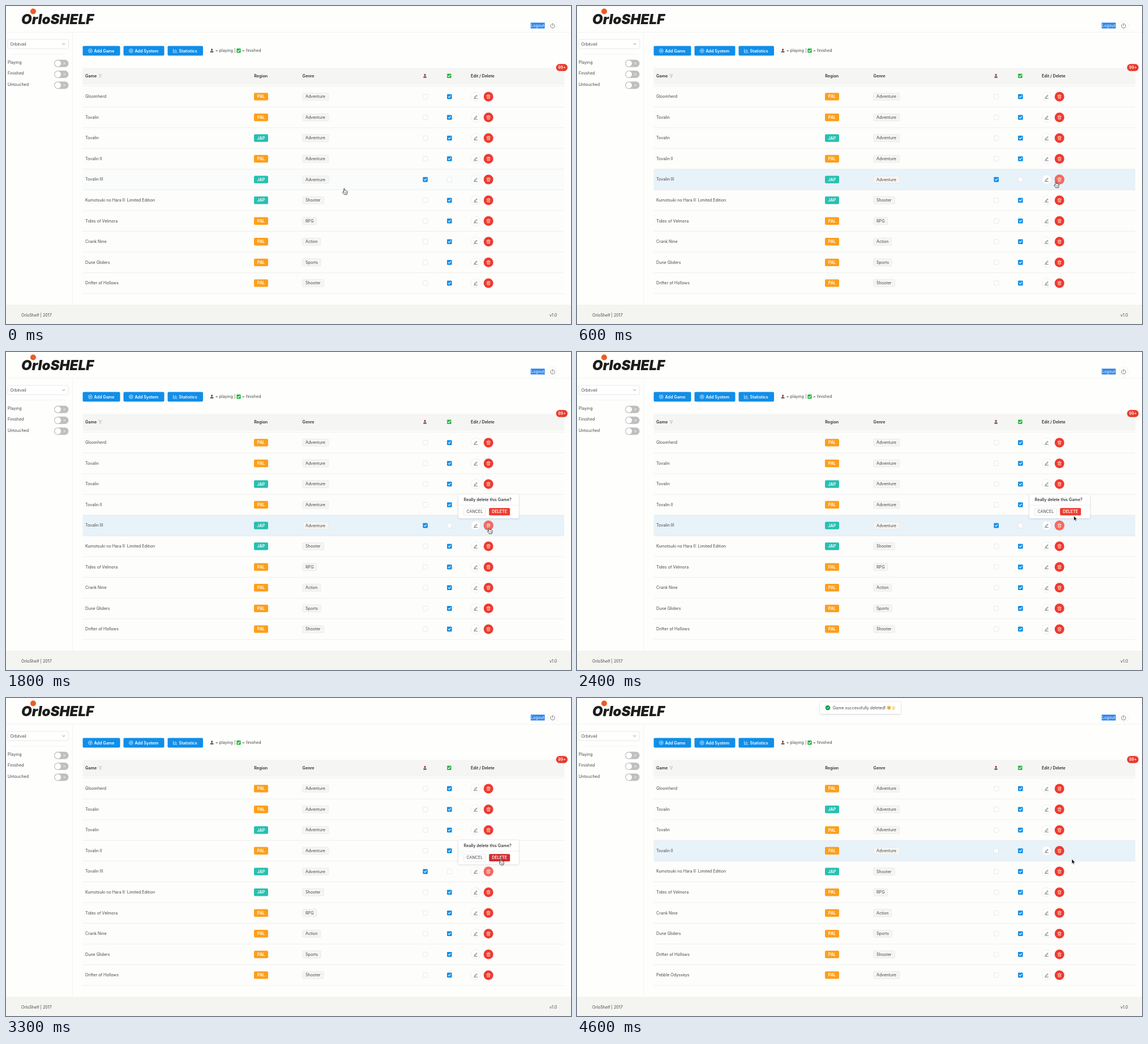
An HTML page that plays this animation: 998 px wide and 561 px high, repeating every 4.7 s.

```html
<!DOCTYPE html>
<html lang="en">
<head>
<meta charset="utf-8">
<title>Game shelf</title>
<style>
  html, body { margin: 0; width: 100%; height: 100%; overflow: hidden; background: #fefefc; }
  svg { display: block; width: 998px; height: 561px; }
  text { font: 7.15px Inter, "Open Sans", sans-serif; fill: #484848; }
  .strong { font-weight: 600; fill: #303030; }
  .light { font-weight: 600; fill: #fff; }
  .logo { font: italic 900 24px Inter, sans-serif; fill: #1d1d1d; }
  .line { fill: none; stroke-linecap: round; stroke-linejoin: round; }
</style>
</head>
<body>
<svg id="stage" viewBox="0 0 998 561" xmlns="http://www.w3.org/2000/svg"></svg>
<script>
const LOOP = 4700, STEP = 100;
const BLUE = '#108ee9', RED = '#ee3b2f', ROW = 36.56, TOP = 141.6;
const stage = document.getElementById('stage');

const text = (x, y, s, cls = '', extra = '') => `<text x="${x}" y="${y}" class="${cls}" ${extra}>${s}</text>`;
const rect = (x, y, w, h, fill, r = 0, extra = '') =>
  `<rect x="${x}" y="${y}" width="${w}" height="${h}" rx="${r}" fill="${fill}" ${extra}/>`;
const circle = (x, y, r, fill, extra = '') => `<circle cx="${x}" cy="${y}" r="${r}" fill="${fill}" ${extra}/>`;
const line = (d, color, width = 0.7) => `<path class="line" d="${d}" stroke="${color}" stroke-width="${width}"/>`;
const at = (x, y, body, extra = '') => `<g transform="translate(${x} ${y})" ${extra}>${body}</g>`;
const border = (color, width = 0.6) => `stroke="${color}" stroke-width="${width}"`;

const tick = (color, width = 1.1) => line('M-2 0L-.5 1.6L2.1-1.5', color, width);
const joystick = rect(-2.8, 1, 5.6, 2.5, '#66606a', 0.7) + rect(-0.5, -1.5, 1, 3, '#555') + circle(0, -1.8, 1.6, '#a8323c');
const greenTick = rect(-3.7, -3.7, 7.4, 7.4, '#22b53c', 1) + tick('#fff', 1.2);
const plus = line('M-1.7 0H1.7M0-1.7V1.7', '#fff') + circle(0, 0, 3.4, 'none', border('#fff', 0.7));
const chart = line('M-3.3-3V3H3.5M-1.5 1V-.3M.2 1V-2M2 1V-1', '#fff');
const trash = line('M-3-2H3M-1-2V-3.1H1V-2M-2.4-2L-2.1 3.2H2.1L2.4-2M-.7-.3V1.7M.7-.3V1.7', '#fff', 0.65);
const pencil = line('M-3 3.2H3M-1.8 1.6L-1.5 .2L1.6-2.9L2.7-1.9L-.4 1.3Z', '#444', 0.7);

function checkbox(x, checked) {
  return at(x, 0, checked
    ? rect(-4.3, -4.3, 8.6, 8.6, BLUE, 1.1) + tick('#fff')
    : rect(-4, -4, 8, 8, '#fff', 1, border('#d9d9d9')));
}

function button(x, w, label, icon, labelX) {
  return rect(x, 70.5, w, 17, BLUE, 2) + at(x + 13.3, 79, icon) + text(labelX, 81.6, label, 'light');
}

function tableRow([name, region, genre, playing], i) {
  const tagWidth = { Adventure: 46, Shooter: 37.5, RPG: 25, Action: 32, Sports: 32.5 }[genre];
  return at(0, TOP + ROW * (i + 0.5),
    line(`M135.5 ${ROW / 2}H986`, '#e8e8ea', 0.7) +
    text(140, 2.3, name) +
    rect(438, -6.7, 25, 13.4, region === 'PAL' ? '#fd9f1c' : '#28c0b1', 2) +
    text(450.5, 2.5, region, 'light', 'text-anchor="middle"') +
    rect(523.8, -6.4, tagWidth, 12.8, '#f5f5f3', 1.5, border('#e3e3e3')) + text(529, 2.4, genre) +
    checkbox(740.6, playing) + checkbox(783.3, !playing) +
    circle(829.5, 0, 8.2, '#fff', border('#e4e4e4')) + at(829.5, 0.2, pencil) +
    circle(852.2, 0, 8.5, RED) + at(852.2, 0, trash));
}

const shelf = [
  ['Gloomherd', 'PAL', 'Adventure'], ['Tovalin', 'PAL', 'Adventure'], ['Tovalin', 'JAP', 'Adventure'],
  ['Tovalin II', 'PAL', 'Adventure'], ['Tovalin III', 'JAP', 'Adventure', true],
  ['Kumotsuki no Hara II: Limited Edition', 'JAP', 'Shooter'], ['Tides of Velmora', 'PAL', 'RPG'],
  ['Crank Nine', 'PAL', 'Action'], ['Dune Gliders', 'PAL', 'Sports'],
  ['Drifter of Hollows', 'PAL', 'Shooter'], ['Pebble Odysseys', 'PAL', 'Adventure']
];
const remaining = shelf.filter(game => !game[3]);
[remaining[1], remaining[2]] = [remaining[2], remaining[1]];
const table = games => games.slice(0, 10).map(tableRow).join('');

const header =
  text(27, 32, 'OrloSHELF', 'logo') + circle(48, 9.5, 5, '#ee5a24') +
  line('M0 46.3H998', '#ececea') +
  rect(926.8, 29.4, 24.8, 10.2, '#2f86ea') + text(927.3, 37, 'Logout', '', 'style="fill:#fff"') +
  circle(965.5, 34.6, 8.4, '#fff', border('#e9e9e9')) +
  at(965.5, 34.8, line('M-2-3A3.8 3.8 0 1 0 2-3M0-4.3V-.3', '#555', 0.8));

const toggle = (label, y) => text(3, y + 1.9, label) + at(85, y,
  rect(0, -5.5, 25.5, 13, '#bfbfbf', 6.5) + circle(6.7, 1, 5.4, '#fff') +
  line('M16.6-.5L19.6 2.5M19.6-.5L16.6 2.5', '#fff', 0.7));

const sidebar =
  rect(3.2, 58.9, 107.4, 16.4, '#fff', 2, border('#d9d9d9')) + text(7.5, 69.6, 'Orbitveil') +
  line('M99.8 66L101.8 68.2L103.8 66', '#777', 0.8) +
  line('M10 85H105', '#ececec') + line('M117.5 47V527', '#eeeeec') +
  toggle('Playing', 100.3) + toggle('Finished', 119.5) + toggle('Untouched', 138.7);

const toolbar =
  button(135.5, 66, 'Add Game', plus, 155.5) +
  button(207.5, 72, 'Add System', plus, 227.5) +
  button(285.5, 62.5, 'Statistics', chart, 305.5) +
  at(363.6, 78.6, joystick) + text(369.8, 81.4, '= playing |') +
  at(411, 78.8, greenTick) + text(417, 81.4, '= finished');

const tableHead =
  rect(135.5, 109, 851, 30, '#f5f5f3', 2) + line('M135.5 141.3H986', '#e8e8ea') +
  [[140, 'Game'], [438.3, 'Region'], [523.6, 'Genre'], [821, 'Edit / Delete']]
    .map(([x, label]) => text(x, 126, label, 'strong')).join('') +
  line('M164 121H169L167.2 123.3V126H165.8V123.3Z', '#aaa', 0.6) +
  at(740, 123.2, joystick) + at(782.8, 123.3, greenTick) +
  rect(971.6, 102.2, 20.4, 12.6, '#e73a2d', 6.3) +
  text(981.8, 111.1, '99+', 'light', 'text-anchor="middle" style="font-weight:500"');

const footer = rect(0, 527, 998, 34, '#f4f4f1') + text(27, 548.3, 'OrloShelf | 2017') + text(960, 548.3, 'v1.0');

const popup =
  rect(799, 251, 107, 42.2, '#fff', 2, 'filter="url(#shadow)"') +
  text(808.6, 263.2, 'Really delete this Game?', '', 'style="font-size:7.2px;font-weight:500;fill:#222"') +
  line('M799 270.2H906', '#e9e9e9') +
  rect(808.6, 275.5, 38.6, 12.6, '#fff', 1.6, border('#d9d9d9')) +
  text(827.9, 284.4, 'CANCEL', '', 'text-anchor="middle"') +
  rect(853.2, 275.2, 37, 13, RED, 1.6, 'id="confirm"') +
  text(871.7, 284.4, 'DELETE', 'light', 'text-anchor="middle"');

const toast =
  rect(429, 7, 143, 21, '#fff', 2, 'filter="url(#shadow)"') +
  circle(443, 17.2, 4.3, '#0f9d4c') + at(443, 17.2, tick('#fff', 0.9)) +
  text(451.8, 19.7, 'Game successfully deleted!') +
  circle(551, 17.2, 3.4, '#f6c95c') + line('M549.4 16.2H550.2M552 16.2H552.8M549.8 18.6Q551.2 19.5 552.6 18.3', '#7a5320', 0.6) +
  at(559.2, 17.4, rect(-2.4, -1, 4.6, 4.4, '#f3d9a8', 1.6) + line('M-2 0L-2.8-2.2M-.6-.8L-1-3.2M.8-.8V-3M2 .4L3.2-1', '#f3d9a8', 1.1));

const arrow = '<path d="M0 0V8.4L1.9 6.7L3.2 9.5L4.6 8.9L3.4 6.2H6Z" fill="#111" stroke="#fff" stroke-width=".6"/>';
const hand = '<path d="M-.9.7Q-.8-.2 0-.2Q.8-.2.9.7V3.5Q2.2 3 2.6 4Q3.8 3.6 4.1 4.5Q5.5 4.3 5.5 5.7V7.4L4.5 10.6H-.1L-2.8 6.9Q-3.2 5.8-2.2 5.6L-.9 6.5Z" fill="#fff" stroke="#222" stroke-width=".8"/>' +
  line('M.8 6.5V8.8M2.3 6.5V8.8M3.8 6.5V8.8', '#444', 0.5);

const group = (id, body) => `<g id="${id}">${body}</g>`;
stage.innerHTML =
  '<defs><filter id="shadow" x="-10%" y="-25%" width="120%" height="160%">' +
  '<feDropShadow dx="0" dy=".6" stdDeviation="1.6" flood-opacity=".22"/></filter></defs>' +
  rect(0, 0, 998, 561, '#fefefc') + rect(135.5, 141, 851, 367, '#fdfdfb') +
  header + sidebar + toolbar + tableHead + footer +
  rect(135.5, TOP, 850.5, ROW, '#e8f2f9', 0, 'id="highlight"') +
  group('before', table(shelf)) + group('after', table(remaining)) +
  group('pressed', at(852.2, TOP + ROW * 4.5, circle(0, 0, 8.5, '#f26a62') + trash)) +
  group('popup', popup) + group('toast', toast) +
  group('cursor', group('arrow', arrow) + group('hand', hand));

const el = id => document.getElementById(id);
const show = (id, visible) => el(id).setAttribute('display', visible ? 'inline' : 'none');
const fade = (t, start, length) => Math.min(1, Math.max(0, (t - start) / length));

// Pointer tip: time, x, y
const path = [
  [0, 597.5, 322], [100, 650, 320], [200, 716, 316], [300, 773.5, 312.5], [400, 815, 311],
  [500, 838, 310], [700, 853.5, 310], [1900, 853.5, 310], [2400, 877.5, 289], [2700, 874, 284], [LOOP, 874, 284]
];

function pointer(t) {
  const i = path.findIndex(p => p[0] > t);
  const [a, b] = [path[i - 1], path[i]];
  const k = (t - a[0]) / (b[0] - a[0]);
  return [a[1] + (b[1] - a[1]) * k, a[2] + (b[2] - a[2]) * k];
}

function render(t) {
  const deleted = t >= 4500;
  const overTrash = t >= 600 && t < 2100;
  const overConfirm = t >= 2700;
  const pointing = t < 100 || overTrash || (overConfirm && t < 4300);

  show('before', !deleted);
  show('after', deleted);
  show('pressed', t >= 600 && !deleted);
  show('popup', t >= 1500 && !deleted);
  show('toast', deleted);
  show('hand', pointing);
  show('arrow', !pointing);

  el('popup').setAttribute('opacity', fade(t, 1400, 200));
  el('confirm').setAttribute('fill', overConfirm ? '#cf2a2e' : RED);

  const arriving = fade(t, 4400, 200);
  el('toast').setAttribute('opacity', arriving);
  el('toast').setAttribute('transform', `translate(0 ${-12 * (1 - arriving)})`);

  const hover = deleted ? arriving : fade(t, -100, 500) * (1 - fade(t, 2400, 300));
  el('highlight').setAttribute('opacity', hover);
  el('highlight').setAttribute('y', TOP + ROW * (deleted ? 3 : 4));

  el('cursor').setAttribute('transform', `translate(${pointer(t).join(' ')})`);
}

const begin = performance.now();
function frame() {
  const t = (performance.now() - begin) % LOOP;
  render(Math.floor(t / STEP) * STEP);
  requestAnimationFrame(frame);
}
frame();
</script>
</body>
</html>
```
